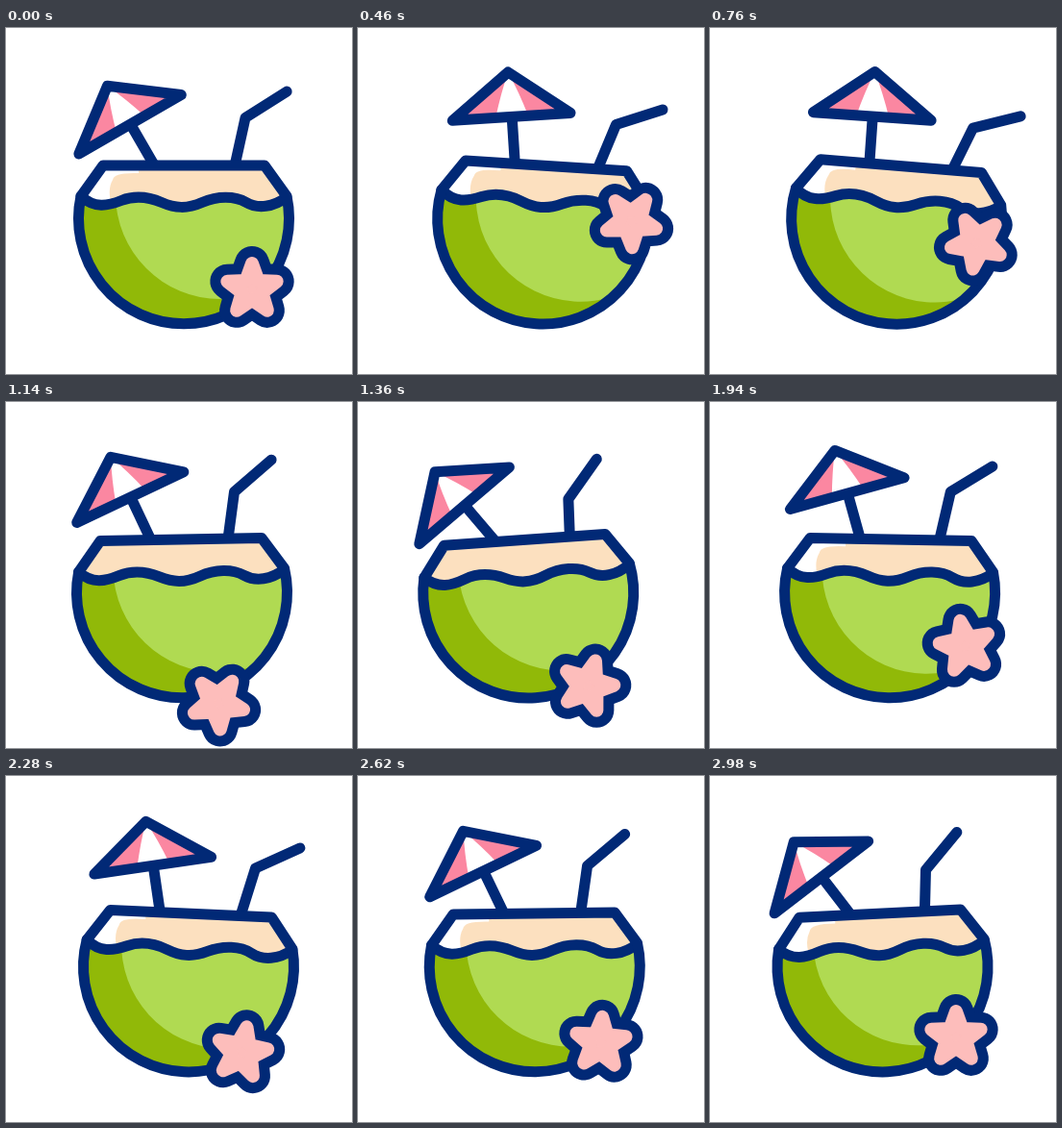
Animation of 360 by 360 pixels, one loop 3 s. Source, as an HTML page:

```html
<!DOCTYPE html>
<html lang="en">
<head>
<meta charset="utf-8">
<title>Coconut drink</title>
<style>
  html, body { margin: 0; width: 100%; height: 100%; overflow: hidden; background: #fff; }
  svg { display: block; width: 100%; height: 100%; }
  .line { fill: none; stroke: #012976; stroke-width: 11; stroke-linecap: round; stroke-linejoin: round; }
  .pink { fill: #fb87a1; }
</style>
</head>
<body>
<svg viewBox="0 0 360 360">
  <defs>
    <clipPath id="shell"><path d="M101 143H269L292 175A109.5 109.5 0 1 1 78 175Z"/></clipPath>
    <clipPath id="juice"><path/></clipPath>
  </defs>
  <path id="straw" class="line"/>
  <g id="umbrella">
    <path class="line" d="M0 3V-45"/>
    <path fill="#fff" d="M-62-45L-1-91.5L61-45Z"/>
    <path class="pink" d="M-1-91.5Q-10-70-17-45H-62Z"/>
    <path class="pink" d="M-1-91.5Q9-70 17-45H61Z"/>
    <path class="line" d="M-62-45L-1-91.5L61-45Z"/>
  </g>
  <g id="coconut">
    <g clip-path="url(#shell)">
      <path fill="#fce0bf" d="M70 130H300V220H70Z"/>
      <path id="shine" fill="#fff" d="M96 143H138V151Q112 150 111 158Q104 170 112 190H70Z"/>
      <g clip-path="url(#juice)">
        <path fill="#91b908" d="M60 120H310V320H60Z"/>
        <circle cx="223" cy="173" r="109" fill="#b0da52"/>
      </g>
    </g>
    <path class="line" id="wave"/>
    <path class="line" d="M101 143H269L292 175A109.5 109.5 0 1 1 78 175Z"/>
  </g>
  <g id="star" stroke-linejoin="round">
    <path stroke="#012976" stroke-width="36"/>
    <path stroke="#fdbdbb" stroke-width="14" fill="#fdbdbb"/>
  </g>
</svg>
<script>
const LOOP = 3000;
const $ = selector => document.querySelector(selector);
const mix = (a, b, p) => a + (b - a) * p;
const ease = p => (1 - Math.cos(Math.PI * Math.min(1, p))) / 2;

const wave = 'M78 175C92 188 106 185 120 179.5S148 175.5 162 181.5S188 188.5 204 181.5S238 174.5 250 181.5S278 186.5 292 176';
$('#wave').setAttribute('d', wave);
$('#juice path').setAttribute('d', wave + 'L310 180V330H60V175Z');

const starPath = 'M' + Array.from({ length: 10 }, (_, i) => {
  const r = i % 2 ? 11 : 27, a = (i * 36 - 90) * Math.PI / 180;
  return (r * Math.cos(a)).toFixed(2) + ' ' + (r * Math.sin(a)).toFixed(2);
}).join('L') + 'Z';
document.querySelectorAll('#star path').forEach(p => p.setAttribute('d', starPath));

// Turning points of the rocking motion
const ROCK = [
  { at: 0, tilt: 0, lean: -30, sway: 0.8 },
  { at: 690, tilt: 4.9, lean: 5, sway: 4.9 },
  { at: 1450, tilt: -4.3, lean: -42, sway: -4.3 },
  { at: 2180, tilt: 2.8, lean: -7, sway: 2.7 },
  { at: 2950, tilt: -2.8, lean: -37.5, sway: -3.1 }
];

// The star leaves its rest and swings back and forth, losing a quarter each time
const STAR = [{ at: 0, angle: 0 }];
for (let i = 0; i < 5; i++) {
  STAR.push({ at: 590 + 565 * i, angle: (i % 2 ? 43 : -43) * (1 - i / 4) });
}

function sample(keys, t, name) {
  let i = 0;
  while (i < keys.length - 2 && t >= keys[i + 1].at) i++;
  const a = keys[i], b = keys[i + 1];
  return mix(a[name], b[name], ease((t - a.at) / (b.at - a.at)));
}

function drawStraw(sway) {
  const baseX = 236 + 4 * sway, baseY = 137 + 1.1 * sway;
  const bendX = 244 + 6.3 * sway, bendY = 93 + 0.5 * sway * sway;
  const angle = (54 + 4.7 * sway) * Math.PI / 180;
  const tipX = bendX + 51 * Math.sin(angle), tipY = bendY - 51 * Math.cos(angle);
  const footX = mix(bendX, baseX, 1.15), footY = mix(bendY, baseY, 1.15);
  $('#straw').setAttribute('d', `M${footX} ${footY}L${bendX} ${bendY}L${tipX} ${tipY}`);
}

function drawStar(a) {
  const x = 256 - 0.93 * a - 0.005 * a * a;
  const y = 272 + 1.55 * a - 0.008 * a * a;
  $('#star').setAttribute('transform', `translate(${x} ${y}) rotate(${a})`);
}

function draw(t) {
  const tilt = sample(ROCK, t, 'tilt'), lean = sample(ROCK, t, 'lean');
  const rock = `rotate(${tilt} 185 310)`;
  $('#coconut').setAttribute('transform', rock);
  $('#umbrella').setAttribute('transform', `${rock} translate(152 139) rotate(${lean - tilt})`);
  drawStraw(sample(ROCK, t, 'sway'));
  drawStar(sample(STAR, t, 'angle'));
  $('#shine').setAttribute('visibility', t > 1000 && t < 1900 ? 'hidden' : 'visible');
}

const start = performance.now();
function tick() {
  draw((performance.now() - start) % LOOP);
  requestAnimationFrame(tick);
}
tick();
</script>
</body>
</html>
```
